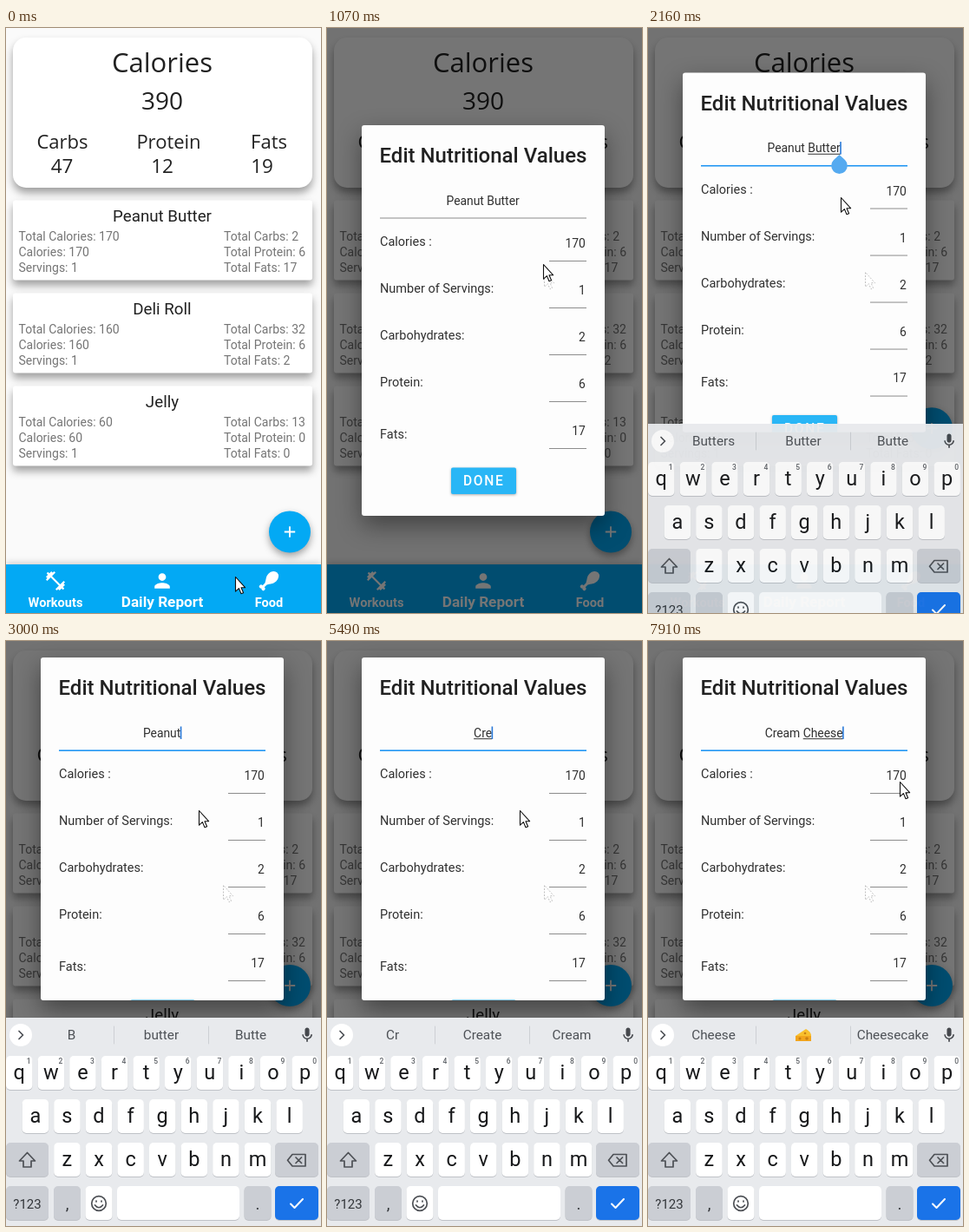
Write an HTML page that moves like this. It is 363x674 px and loops after 7.99 s.

```html
<!DOCTYPE html>
<html lang="en">
<head>
<meta charset="utf-8">
<title>Daily report</title>
<style>
html, body { margin: 0; width: 100%; height: 100%; overflow: hidden; background: #fafafa; }
svg { display: block; width: 363px; height: 674px; font-family: Roboto, sans-serif; }
text { white-space: pre; }
.mid { text-anchor: middle; }
.end { text-anchor: end; }
.round { font-family: "Open Sans", "Noto Sans", sans-serif; fill: #212121; }
.item { font-size: 18.75px; fill: #212121; }
.small { font-size: 14px; fill: #757575; }
.label { font-size: 14.5px; fill: #303030; }
.value { font-size: 13.86px; fill: #303030; }
.nav { font-weight: 700; fill: #fff; }
.key { font-size: 23.5px; fill: #17181a; }
.digit { font-size: 8.5px; font-weight: 500; fill: #5f6368; }
.word { font-size: 15.3px; fill: #4d5156; }
.card { fill: #fff; filter: drop-shadow(0 6px 5px rgba(0,0,0,.36)); }
.lift { filter: drop-shadow(0 4px 4px rgba(0,0,0,.36)); }
.button { filter: drop-shadow(0 1.5px 1.5px rgba(0,0,0,.32)); }
.bar { filter: drop-shadow(0 -1px 4px rgba(0,0,0,.22)); }
.panel { fill: #fdfdfd; filter: drop-shadow(0 11px 14px rgba(0,0,0,.42)); }
.line { fill: none; stroke: #4d5055; stroke-width: 1.7; stroke-linecap: round; stroke-linejoin: round; }
</style>
</head>
<body>
<svg id="stage" viewBox="0 0 363 674"></svg>
<script>
const LOOP = 7990;

const text = (x, y, s, cls, size, extra = '') =>
  `<text x="${x}" y="${y}" class="${cls}" ${size ? `style="font-size:${size}px"` : ''} ${extra}>${s}</text>`;
const rect = (x, y, w, h, fill, r = 0, extra = '') =>
  `<rect x="${x}" y="${y}" width="${w}" height="${h}" rx="${r}" fill="${fill}" ${extra}/>`;
const icon = (x, y, k, d, fill) =>
  `<path transform="translate(${x} ${y}) scale(${k}) translate(-12 -12)" fill="${fill}" d="${d}"/>`;
const line = (d, extra = '') => `<path class="line" d="${d}" ${extra}/>`;

const PERSON = 'M12 12c2.2 0 4-1.8 4-4s-1.8-4-4-4-4 1.8-4 4 1.8 4 4 4zm0 2c-2.7 0-8 1.3-8 4v2h16v-2c0-2.7-5.3-4-8-4z';
const DUMBBELL = 'M20.6 14.9L22 13.4 20.6 12 17 15.6 8.4 7 12 3.4 10.6 2 9.1 3.4 7.7 2 5.6 4.1 4.1 2.7 2.7 4.1l1.4 1.5L2 7.7l1.4 1.4L2 10.6 3.4 12 7 8.4 15.6 17 12 20.6 13.4 22l1.5-1.4L16.3 22l2.1-2.1 1.5 1.4 1.4-1.4-1.4-1.5L22 16.3z';
const MIC = 'M12 14c1.7 0 3-1.3 3-3V5c0-1.7-1.3-3-3-3S9 3.3 9 5v6c0 1.7 1.3 3 3 3zm5-3c0 2.8-2.2 5-5 5s-5-2.2-5-5H5.3c0 3.4 2.7 6.2 5.7 6.7V21h2v-3.3c3.3-.5 6-3.3 6-6.7z';
const ARROW = 'M.5.5V17.2L4.4 13.6 7 19.8 9.6 18.7 7 12.7H11.6Z';

function summary() {
  const cols = [['Carbs', 65, 47, 64.5], ['Protein', 187.5, 12, 180], ['Fats', 303, 19, 295]];
  return rect(8, 11, 345, 173, '#fff', 15, 'class="card"') +
    text(180, 51, 'Calories', 'round mid', 31) + text(180, 94, 390, 'round mid', 28) +
    cols.map(([name, x, n, nx]) =>
      text(x, 139, name, 'round mid', 22) + text(nx, 167, n, 'round mid', 22.5)).join('');
}

function food([name, cal, carbs, protein, fats], i) {
  const y = 198.5 + 107 * i;
  const left = [`Total Calories: ${cal}`, `Calories: ${cal}`, 'Servings: 1'];
  const right = [`Total Carbs: ${carbs}`, `Total Protein: ${protein}`, `Total Fats: ${fats}`];
  const column = (x, rows) => rows.map((s, n) => text(x, y + 46 + 18 * n, s, 'small')).join('');
  return rect(8, y, 345, 92, '#fff', 3, 'class="card"') +
    text(180, y + 24.5, name, 'item mid') + column(14.5, left) + column(251, right);
}

function navBar() {
  return rect(0, 618, 363, 56, '#03a9f4', 0, 'class="bar"') +
    icon(57, 637, 1.1, DUMBBELL, '#fff') + icon(180, 637, 1.1, PERSON, '#fff') +
    `<g transform="translate(303 637) rotate(-45)" fill="#fff"><ellipse cx="5.5" rx="8" ry="6.3"/>
      <path d="M2-5.5L-5-1.5H-11V1.5H-5L2 5.5z"/><circle cx="-11" cy="-1.8" r="2.2"/><circle cx="-11" cy="1.8" r="2.2"/></g>` +
    text(57, 667, 'Workouts', 'nav mid', 14.6) + text(180, 666.5, 'Daily Report', 'nav mid', 17.2) +
    text(303, 667, 'Food', 'nav mid', 14.6);
}

function dialog() {
  const rows = [['Calories :', 251, 170, 253], ['Number of Servings:', 305, 1, 307],
    ['Carbohydrates:', 359, 2, 361], ['Protein:', 413, 6, 415], ['Fats:', 473, 17, 468.5]];
  return `<clipPath id="clip"><rect id="hole" x="40" width="280"/></clipPath>
    <rect id="panel" class="panel" x="40" width="280" rx="3"/>
    <g clip-path="url(#clip)"><g id="form">` +
    text(180, 155, 'Edit Nutritional Values', 'mid', 24, 'font-weight="500" fill="#212121"') +
    '<rect id="rule" x="61" width="238"/>' +
    text(180, 203.5, 'Name', 'value mid', 0, 'id="hint" fill-opacity=".6"') +
    text(0, 203.5, '', 'value', 0, 'id="name"') +
    rect(0, 205.2, 0, 1, '#303030', 0, 'id="under"') +
    rect(0, 191.5, 1.6, 14.5, '#2979d8', 0, 'id="caret"') +
    '<path id="handle" fill="#55aaf0" d="M220.5 206.5L227 212.5A9.3 9.3 0 1 1 214 212.5Z"/>' +
    rows.map(([s, y, n, ny], i) => text(61, y, s, 'label') + text(297.8, ny, n, 'value end') +
      rect(256, 268 + 54 * i, 43, 1, '#8c8c8c')).join('') +
    rect(143, 506.4, 75, 30.6, '#29b6f6', 2, 'class="button"') +
    text(180.8, 527.3, 'DONE', 'mid', 15.6, 'font-weight="500" fill="#fff" letter-spacing="1.7"') +
    '</g></g>';
}

function keyboard() {
  const cap = (x, y, w, fill) => rect(x, y + 1, w, 39, '#bfc2c7', 5) + rect(x, y, w, 39, fill, 5);
  const letters = (s, x0, y) => [...s].map((c, i) => {
    const x = x0 + 36.6 * i;
    return cap(x - 15.2, y - 20, 30.5, '#fff') + text(x, y + 6.5, c, 'key mid letter') +
      (y < 500 ? text(x + 11, y - 11, (i + 1) % 10, 'digit mid') : '');
  }).join('');
  const dark = '#cbced4';
  return rect(0, 434, 363, 240, '#e8eaed') +
    '<circle cx="17" cy="454" r="13" fill="#fff"/>' +
    line('', 'id="chevron"') + icon(347, 454, .85, MIC, '#45484d') +
    '<g id="words">' + [75.5, 179, 282].map(x => text(x, 459, '', 'word mid')).join('') +
    line('M124.5 444V464M233.5 444V464', 'style="stroke:#cdd0d4;stroke-width:1"') +
    '<g id="cheese"><path fill="#f9c02d" d="M170 455L182 447Q188 450 188 455Z"/><path fill="#f2a51d" d="M170 455H188V461H170Z"/><g fill="#c97f12"><circle cx="175" cy="458" r="1.5"/><circle cx="183" cy="458" r="1.8"/><circle cx="181" cy="452" r="1.3"/></g></g></g>' +
    '<g id="tools">' +
    line('M63 447.5H71Q74 447.5 74 450V455L69 460.5H63Q60.5 460.5 60.5 458V450Q60.5 447.5 63 447.5ZM69 460V455.5H74M64 451.5V452M69.5 451.5V452M63.5 455Q65 457 67 456.5') +
    text(120.4, 458.2, 'GIF', 'mid', 12.3, 'font-weight="900" fill="#4d5055" letter-spacing=".8"') +
    line('M169 448.5H180V461H169ZM172.5 448.5V446.5H176.5V448.5M171.8 452.5H177.2M171.8 455H177.2M171.8 457.5H175') +
    '<g fill="none" stroke="#4d5055"><circle cx="228" cy="454" r="4.2" stroke-width="3"/><circle cx="228" cy="454" r="6.4" stroke-width="2.4" stroke-dasharray="3.35"/></g>' +
    line('M260.5 444V464', 'style="stroke:#cdd0d4;stroke-width:1"') +
    [288, 293, 298].map(x => `<circle cx="${x}" cy="454" r="1.6" fill="#4d5055"/>`).join('') + '</g>' +
    letters('qwertyuiop', 15.2, 498) + letters('asdfghjkl', 33.8, 548) + letters('zxcvbnm', 70.4, 598) +
    cap(0, 578, 49, dark) + line('M24.5 589.5L33.5 599H29V606H20V599H15.5Z', 'id="shift"') +
    cap(310, 578, 50, dark) + line('M330 591.5H345V605H330L324.5 598.2ZM334 595L340.5 601.5M340.5 595L334 601.5') +
    cap(0, 628, 49, dark) + text(24.5, 653.5, '?123', 'mid', 15, 'fill="#33363a"') +
    cap(55, 628, 31, dark) + text(70.5, 655, ',', 'mid', 19, 'fill="#33363a"') +
    cap(91.5, 628, 31, '#fff') +
    '<circle class="line" cx="107" cy="648" r="8.3"/>' + line('M104 645V646M110 645V646M102.5 650Q107 655.5 111.5 650') +
    cap(128, 628, 141, '#fff') +
    cap(274.5, 628, 31, dark) + text(290, 655, '.', 'mid', 19, 'fill="#33363a"') +
    cap(310, 628, 50, '#1a73e8') + line('M328 648.5L332.5 653L342 643', 'style="stroke:#fff;stroke-width:2"');
}

const foods = [['Peanut Butter', 170, 2, 6, 17], ['Deli Roll', 160, 32, 6, 2], ['Jelly', 60, 13, 0, 0]];

document.getElementById('stage').innerHTML =
  rect(0, 0, 363, 674, '#fafafa') + summary() + foods.map(food).join('') + navBar() +
  `<g id="fab"><circle class="lift" cx="327" cy="580.5" r="24" fill="#03a9f4"/>
    <path d="M320.8 580.5H333.2M327 574.3V586.7" stroke="#fff" stroke-width="1.8"/></g>` +
  rect(0, 0, 363, 674, '#000', 0, 'id="scrim"') +
  `<g id="dialog">${dialog()}</g>
  <path id="trace" transform="translate(250 281)" d="${ARROW}" fill="#fff" stroke="#c2c2c2" stroke-dasharray="2 1.5"/>
  <g id="keyboard">${keyboard()}</g>
  <path id="pointer" d="${ARROW}" fill="#fff" stroke="#111" stroke-width="1.1" stroke-linejoin="round"/>`;

// Each row holds from its time in ms until the next row.
const pointerAt = [[0, 264, 632], [70, 272, 608], [150, 281, 560], [230, 278, 498], [300, 268, 428],
  [380, 252, 358], [460, 237, 303], [540, 229, 270], [610, 240, 275], [690, 250, 281],
  [1070, 249, 272], [1150, 245, 253], [1230, 240, 235], [1300, 235, 219], [1380, 231, 206],
  [1460, 228, 198], [1530, 227, 195], [1690, 226, 195], [1860, 222, 195], [6420, 222, 194],
  [7610, 231, 190], [7680, 252, 180], [7760, 272, 170], [7830, 285, 164], [7910, 290, 162]];
const fadeAt = [[0, 0, 0], [840, .35, .3], [920, .8, .76], [1000, 1, 1]];
const riseAt = [[0, 0], [2080, .2], [2150, .65], [2230, 1]];
const boardAt = [[0, 240, 0], [2000, 208, .24], [2080, 95, .6], [2150, 22, .95], [2230, 0, 1]];
const caretAt = [[0, 0], [1860, 1], [3700, 0], [4180, 1], [4710, 0], [5030, 1]];
// name, start of the underlined word (-1 for none)
const nameAt = [[0, 'Peanut Butter', -1], [1860, 'Peanut Butter', 7], [2390, 'Peanut Butte', 7],
  [2850, 'Peanut Bu', 7], [2930, 'Peanut B', 7], [3000, 'Peanut', -1], [3080, 'Pean', -1],
  [3160, 'Pe', -1], [3230, 'P', -1], [3320, '', -1], [5100, 'C', 0], [5260, 'Cr', 0],
  [5490, 'Cre', 0], [5650, 'Crea', 0], [5870, 'Cream', 0], [6270, 'Cream ', 0], [6420, 'Cream ', -1],
  [6650, 'Cream C', 6], [6820, 'Cream Ch', 6], [6890, 'Cream Che', 6], [7140, 'Cream Chee', 6],
  [7360, 'Cream Chees', 6], [7440, 'Cream Cheese', 6]];
// suggestions; an empty row shows the toolbar
const wordsAt = [[0, 'Butters', 'Butter', 'Butte'], [2620, 'Butt', 'butter', 'Butte'],
  [2930, 'B', 'butter', 'Butte'], [3400], [5180, 'C', 'can', 'Can'], [5340, 'Cr', 'Create', 'Cream'],
  [5570, 'Cre', 'Cream', 'Create'], [5870, 'Crea', 'Cream', 'Create'], [6040, 'Creamy', 'Cream', 'Creams'],
  [6420, 'of', 'cheese', 'and'], [6890, 'Ch', 'Cheese', 'Chicken'], [7210, 'Che', 'Cheese', 'Chef'],
  [7440, 'Chees', 'Cheese', 'Cheesy'], [7610, 'Cheese', '', 'Cheesecake']];

const $ = id => document.getElementById(id);
const at = (rows, t) => rows.findLast(r => r[0] <= t).slice(1);
const set = (id, attrs) => { for (const k in attrs) $(id).setAttribute(k, attrs[k]); };
const show = (id, on) => set(id, { visibility: on ? 'visible' : 'hidden' });
const move = (id, x, y) => set(id, { transform: `translate(${x} ${y})` });
const words = document.querySelectorAll('#words text');
const letters = document.querySelectorAll('.letter');

function drawName(t) {
  const [name, from] = at(nameAt, t);
  const typed = name.trim(), el = $('name');
  el.textContent = typed;
  const w = typed ? el.getComputedTextLength() : 0;
  const x = 179.6 - w / 2;
  const skip = from > 0 ? el.getSubStringLength(0, from) : 0;
  set('name', { x });
  set('under', { x: x + skip, width: from < 0 ? 0 : w - skip });
  set('caret', { x: x + w - .5 + (name !== typed ? 3.5 : 0) });
  show('hint', !typed);
  show('caret', at(caretAt, t)[0]);
}

function drawWords(t) {
  const list = at(wordsAt, t), open = list.length > 0;
  words.forEach((el, i) => el.textContent = list[i] || '');
  set('words', { display: open ? 'inline' : 'none' });
  set('tools', { display: open ? 'none' : 'inline' });
  set('cheese', { display: list[1] === '' ? 'inline' : 'none' });
  set('chevron', { d: open ? 'M15 449.5L19.5 454L15 458.5' : 'M19 449.5L14.5 454L19 458.5' });
}

function draw(t) {
  const [scrim, panel] = at(fadeAt, t), [rise] = at(riseAt, t), [drop, solid] = at(boardAt, t);
  const active = t >= 1860, upper = t >= 5030 && t < 5180;
  const box = { y: 112 - 93 * rise, height: 450 - 55 * rise };
  move('pointer', ...at(pointerAt, t));
  set('scrim', { opacity: .54 * scrim });
  set('dialog', { opacity: panel });
  set('panel', box);
  set('hole', box);
  move('form', 0, -93 * rise);
  move('fab', 0, -183.5 * rise);
  move('keyboard', 0, drop);
  set('keyboard', { opacity: solid });
  set('rule', active ? { y: 218.4, height: 1.6, fill: '#2196f3' } : { y: 218.5, height: 1, fill: '#8c8c8c' });
  show('handle', active && t < 2390);
  show('trace', t >= 1070);
  letters.forEach(el => el.style.textTransform = upper ? 'uppercase' : 'none');
  $('shift').style.fill = upper ? '#4d5055' : 'none';
  drawName(t);
  drawWords(t);
}

const start = performance.now();
function tick() {
  draw((performance.now() - start) % LOOP);
  requestAnimationFrame(tick);
}
tick();
</script>
</body>
</html>
```
